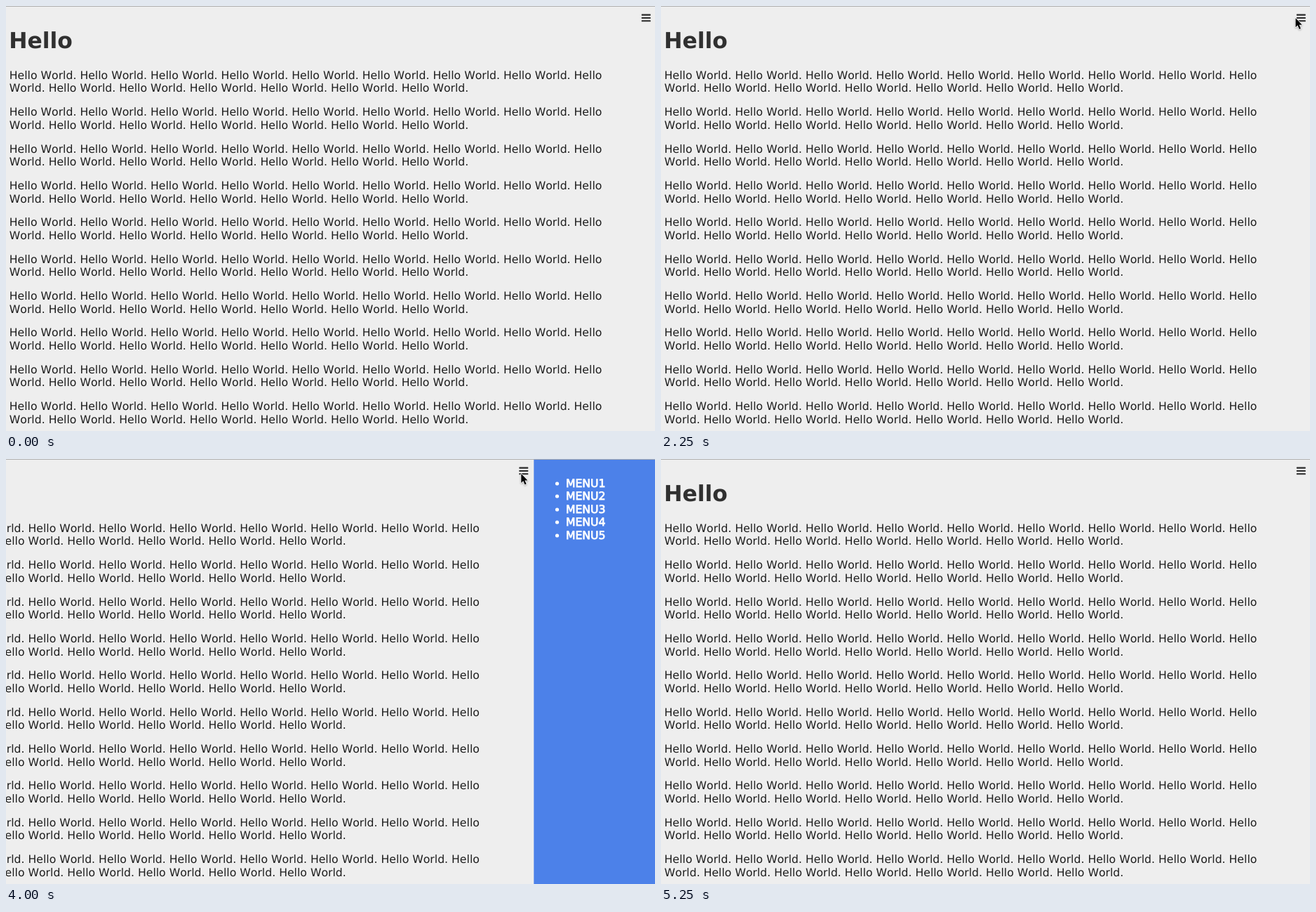
An HTML page for the animation above (6500 ms loop, 925 by 605 pixels).

```html
<!DOCTYPE html>
<html lang="en">
<head>
<meta charset="utf-8">
<title>Sliding menu</title>
<style>
  html, body { margin: 0; width: 100%; height: 100%; overflow: hidden; background: #eee; }
  svg { display: block; width: 925px; height: 605px; }
  text {
    font-family: "DejaVu Sans", Verdana, sans-serif;
    font-size: 15.69px;
    font-kerning: none;
    text-rendering: geometricPrecision;
    fill: #1e1e1e;
  }
  #page .title { font-size: 31.4px; font-weight: bold; fill: #303030; }
  #menu text { fill: #fff; stroke: #fff; stroke-width: .8px; }
  #menu circle { fill: #fff; }
  #cursor { filter: drop-shadow(0 1px 1px rgba(0, 0, 0, .3)); }
</style>
</head>
<body>
<svg viewBox="0 0 925 605">
  <rect width="925" height="605" fill="#4c81e9"/>
  <g id="menu"></g>
  <g id="page">
    <rect x="-10" width="936.8" height="605" fill="#eee"/>
    <text class="title" x="4.2" y="60">Hello</text>
    <g id="burger" fill="#2a2a2a"></g>
  </g>
  <rect width="925" height="1" fill="#b0b0b0"/>
  <path id="cursor" d="M1 1V14L3.9 11.2L6.2 16.6L8.4 15.6L6.1 10.4H10.2Z"
    fill="#000" stroke="#fff" stroke-width="1.6" stroke-linejoin="round" paint-order="stroke"/>
</svg>
<script>
const LOOP = 6500, STEP = 250;
const MENU_WIDTH = 174.5, SLIDE = 500, OPEN = 2500, CLOSE = 4000;
const LEAVE = 5250;

const page = document.getElementById('page');
const menu = document.getElementById('menu');
const burger = document.getElementById('burger');
const cursor = document.getElementById('cursor');

function add(parent, tag, attrs, text = '') {
  const el = document.createElementNS('http://www.w3.org/2000/svg', tag);
  for (const key in attrs) el.setAttribute(key, attrs[key]);
  el.textContent = text;
  parent.appendChild(el);
}

const phrase = 'Hello World. ';
const lines = [phrase.repeat(8) + 'Hello', 'World. ' + phrase.repeat(6).trim()];
for (let i = 0; i < 10; i++) {
  lines.forEach((line, j) => {
    add(page, 'text', { x: 4.8, y: Math.round(103.95 + i * 52.35 + j * 18.5) }, line);
  });
}

for (let i = 0; i < 5; i++) {
  const y = Math.round(39.8 + i * 18.5);
  add(menu, 'circle', { cx: 785.5, cy: y - 5, r: 2.6 });
  add(menu, 'text', { x: 797.9, y }, 'MENU' + (i + 1));
}

for (let i = 0; i < 3; i++) {
  add(burger, 'rect', { x: 905.8, y: 11.6 + i * 4.3, width: 13, height: 2.1, rx: .6 });
}

// Cubic ease-out, clamped to 0..1
const ease = p => 1 - (1 - Math.min(1, Math.max(0, p))) ** 3;
const mix = (a, b, p) => a + (b - a) * p;

// Turning points of the pointer
const stops = [
  { at: 250, x: 265, y: -12 },
  { at: 500, x: 558, y: 32 },
  { at: 750, x: 860, y: 65 },
  { at: 1500, x: 903.5, y: 16.3 },
  { at: 3000, x: 903.5, y: 16.3 },
  { at: 3250, x: 751, y: 34 },
  { at: 4000, x: 733.3, y: 20 },
  { at: 4500, x: 733.3, y: 20 },
  { at: 4750, x: 719, y: 27 },
  { at: 5000, x: 307, y: 22 }
];

function pointer(t) {
  const i = stops.findLastIndex(stop => stop.at <= t);
  const a = stops[i], b = stops[i + 1] || a;
  const p = ease((t - a.at) / (b.at - a.at || 1));
  return `translate(${mix(a.x, b.x, p)} ${mix(a.y, b.y, p)})`;
}

function draw(t) {
  const shift = MENU_WIDTH * (ease((t - OPEN) / SLIDE) - ease((t - CLOSE) / SLIDE));
  page.setAttribute('transform', `translate(${-shift} 0)`);

  const shown = t >= stops[0].at && t < LEAVE;
  cursor.setAttribute('visibility', shown ? 'visible' : 'hidden');
  if (shown) cursor.setAttribute('transform', pointer(t));
}

const start = performance.now();
function tick() {
  const t = (performance.now() - start) % LOOP;
  draw(Math.floor(t / STEP) * STEP);
  requestAnimationFrame(tick);
}
tick();
</script>
</body>
</html>
```
